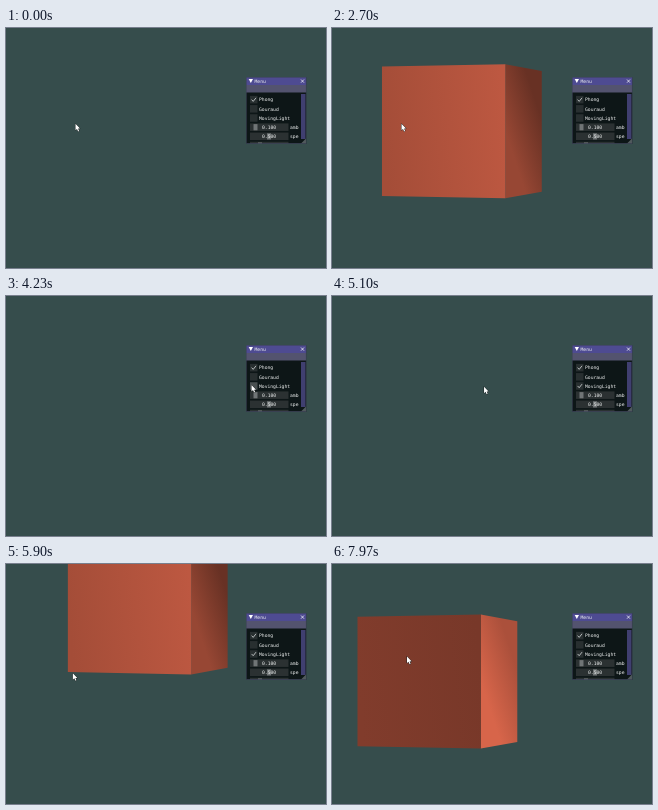
Recreate the animation shown at these times as an HTML page with a canvas. Size 320 px wide and 240 px high, loop 8 s.

```html
<!DOCTYPE html>
<html>
<head>
<meta charset="utf-8">
<style>
  html, body { margin: 0; overflow: hidden; background: #364d4c; }
  canvas { display: block; }
</style>
</head>
<body>
<canvas id="stage" width="320" height="240"></canvas>
<script>
const ctx = document.getElementById('stage').getContext('2d');
const LOOP = 8000;
const HOME = [70, 95.8];
const SENSITIVITY = 4.45; // cube shift per pixel of pointer travel
const CUBE = { size: 134, yaw: 0.318, x: 13.3, y: 103.3, focal: 1166, color: [222, 104, 76] };

// Pointer stops: time, x, y
const path = [
  [0, ...HOME], [2702, ...HOME], [2880, 92, 99.5], [3130, 176.5, 95.6],
  [3500, 240.5, 83.5], [3730, 244, 87.5], [3930, 246, 89], [4620, 246, 89],
  [5100, 152.8, 90.8], [5370, 86, 79], [5440, 84, 79.5], [5900, 67.3, 109.3],
  [6240, 77.5, 94], [6330, 75.5, 92.6], [LOOP, 75.5, 92.6]
];

// Brightness at the left and right edge of each face
const LIGHT = {
  front: { still: [0.74, 0.85], facing: [0.93, 0.81], away: [0.58, 0.54] },
  side: { still: [0.68, 0.47], facing: [0.56, 0.4], away: [0.97, 0.77] }
};

const clamp = v => Math.max(0, Math.min(1, v));
const mix = (a, b, k) => a + (b - a) * k;

function pointerAt(t) {
  const i = path.findIndex(p => p[0] > t);
  const a = path[i - 1], b = path[i];
  const k = (t - a[0]) / (b[0] - a[0]);
  return [mix(a[1], b[1], k), mix(a[2], b[2], k)];
}

function trace(points) {
  ctx.beginPath();
  points.forEach(([x, y]) => ctx.lineTo(x, y));
}

function polygon(points, fill) {
  trace(points);
  ctx.fillStyle = fill;
  ctx.fill();
}

function line(points, color, width) {
  trace(points);
  ctx.strokeStyle = color;
  ctx.lineWidth = width;
  ctx.stroke();
}

function box(x, y, w, h, fill) {
  ctx.fillStyle = fill;
  ctx.fillRect(x, y, w, h);
}

function text(str, x, y) {
  ctx.fillStyle = '#f2f4f4';
  ctx.fillText(str, x, y);
}

// Top and bottom of a vertical cube edge, offset from the nearest one
function cubeEdge(dx, dz) {
  const scale = 1 / (1 + dz / CUBE.focal);
  const x = 160 + (CUBE.x + dx) * scale;
  const half = CUBE.size / 2 * scale;
  return [[x, CUBE.y - half], [x, CUBE.y + half]];
}

function face(left, right, levels) {
  const g = ctx.createLinearGradient(left[0][0], CUBE.y, right[0][0], CUBE.y - 12);
  levels.forEach((level, i) =>
    g.addColorStop(i, `rgb(${CUBE.color.map(c => Math.round(c * level))})`));
  polygon([...left, right[1], right[0]], g);
}

function drawCube(t, [px, py]) {
  const rise = clamp((t - 5900) / 440);
  const angle = Math.max(0, t - 6340) / 1630 * Math.PI / 2;
  const shade = ({ still, facing, away }, swing) =>
    still.map((s, i) => mix(mix(s, facing[i], rise), away[i], swing));
  const across = CUBE.size * Math.cos(CUBE.yaw);
  const along = CUBE.size * Math.sin(CUBE.yaw);
  const near = cubeEdge(0, 0);

  ctx.save();
  ctx.translate((HOME[0] - px) * SENSITIVITY, (HOME[1] - py) * SENSITIVITY);
  face(near, cubeEdge(along, across), shade(LIGHT.side, Math.sin(angle)));
  face(cubeEdge(-across, along), near, shade(LIGHT.front, 1 - Math.cos(angle)));
  ctx.restore();
}

const rowY = i => 71.6 + i * 9.17;

function checkbox(label, row, checked, fill = '#282f30') {
  const y = rowY(row);
  box(244, y - 3.7, 7.5, 7.5, fill);
  if (checked) line([[245.6, y], [247.2, y + 1.8], [250, y - 1.8]], '#b4b9ba', 1);
  text(label, 253, y + 1.8);
}

function slider(label, value, row, grab) {
  const y = rowY(row);
  box(244, y - 3.7, 38.5, 7.5, '#2b3132');
  box(grab, y - 3, 4, 6.2, '#707576');
  text(value, 256, y + 1.8);
  text(label, 284, y + 1.8);
}

function drawMenu(t) {
  ctx.save();
  ctx.beginPath();
  ctx.rect(240, 49, 60.5, 67);
  ctx.clip();
  box(240, 49, 60.5, 67, '#0d1617');
  box(240, 49, 60.5, 8, '#4e4b92');
  box(240, 57, 60.5, 7.5, '#53536f');
  box(295, 66, 4.5, 45, '#403f70');
  polygon([[242.7, 51], [247, 51], [244.8, 55]], '#fff');
  line([[295, 51.5], [298, 54.7]], '#fff', 0.7);
  line([[298, 51.5], [295, 54.7]], '#fff', 0.7);

  ctx.font = '4.7px "DejaVu Sans Mono", monospace';
  text('Menu', 248.5, 54.9);
  const hovered = t > 3600 && t < 4660;
  const pressed = t >= 4230 && t < 4350;
  checkbox('Phong', 0, true);
  checkbox('Gouraud', 1, false);
  checkbox('MovingLight', 2, t >= 4350,
    pressed ? '#4a5051' : hovered ? '#343a3b' : undefined);
  slider('amb', '0.100', 3, 247.5);
  slider('spe', '0.500', 4, 261);
  slider('', '', 5, 252);
  box(240, 115.4, 60.5, 1, '#3d4458');
  polygon([[300, 110.5], [300, 115.5], [295, 115.5]], '#515a5d');
  ctx.strokeStyle = '#3d4458';
  ctx.lineWidth = 0.6;
  ctx.strokeRect(240.3, 49.3, 59.9, 66.2);
  ctx.restore();
}

function drawPointer([x, y]) {
  const shape = [[0, 0], [0, 6.4], [1.5, 5.1], [2.6, 7.6], [3.6, 7.1], [2.6, 4.8], [4.5, 4.7]]
    .map(([dx, dy]) => [x + dx - 0.5, y + dy]);
  line([...shape, shape[0]], '#1a2020', 0.9);
  polygon(shape, '#fff');
}

function draw() {
  const t = performance.now() % LOOP;
  const pointer = pointerAt(t);
  box(0, 0, 320, 240, '#364d4c');
  if (t >= 30) drawCube(t, pointer);
  drawMenu(t);
  drawPointer(pointer);
  requestAnimationFrame(draw);
}
draw();
</script>
</body>
</html>
```
